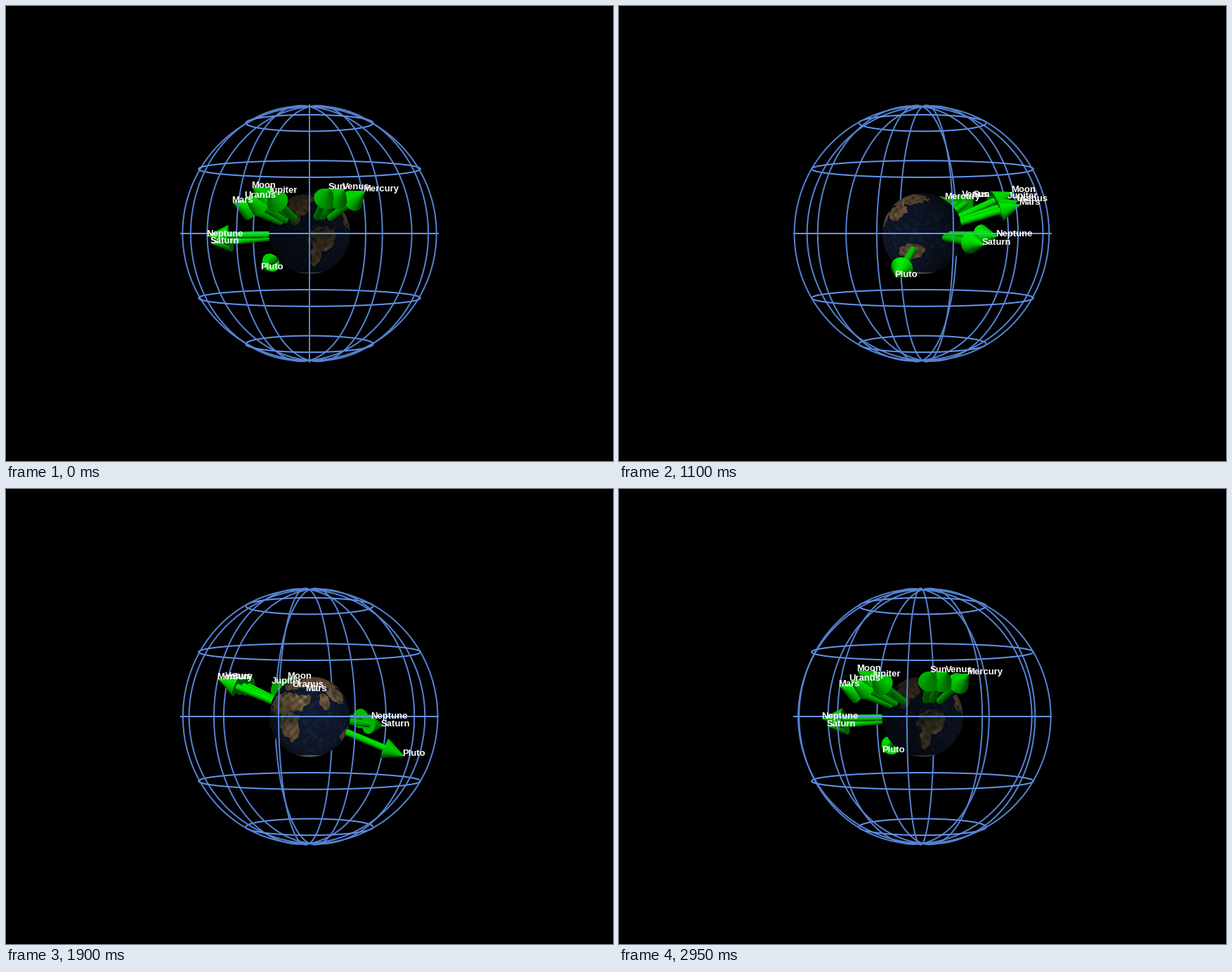
Animation, 864 px wide and 648 px high, one loop 3 s. Source, as a matplotlib script:

```python
import numpy as np
import matplotlib.pyplot as plt
from matplotlib.animation import FuncAnimation
from matplotlib.collections import LineCollection, PolyCollection

W, H, DPI = 864, 648, 100
FRAMES, INTERVAL = 60, 50
CX, CY = W / 2, H / 2
HALF_VIEW = np.radians(15)
FOCAL = CY / np.tan(HALF_VIEW)
DIST = np.sqrt(3) / np.sin(HALF_VIEW)  # fits the unit sphere's bounding box
EARTH_R = 0.319
ARROW = 0.8
LON0 = -77
PX = 72 / DPI

# sky position of each body: right ascension, declination
BODIES = {
    "Sun": (101, 23), "Moon": (56.3, 24.3), "Mercury": (122, 22),
    "Venus": (109.4, 23), "Mars": (44, 16.2), "Jupiter": (67.2, 21),
    "Saturn": (351, -5.8), "Uranus": (52.7, 18.8), "Neptune": (0, -1.4),
    "Pluto": (303.5, -22.6),
}

# land as ragged ovals: longitude, latitude, half width, half height
LAND = [
    (15, 19, 32, 16), (25, -12, 15, 23),                        # Africa
    (20, 51, 28, 11), (95, 58, 70, 16), (105, 33, 20, 14),      # Eurasia
    (46, 23, 11, 9), (78, 21, 8, 12),
    (-105, 57, 45, 14), (-98, 38, 22, 13), (-98, 20, 8, 8),     # Americas
    (-58, -8, 20, 17), (-66, -34, 8, 20),
    (134, -25, 20, 12),                                         # Australia
]
GREENLAND = (-41, 73, 14, 10)


def direction(lon, lat):
    """Unit vector: x right, y up, z towards the camera."""
    lon, lat = np.radians(lon), np.radians(lat)
    return np.stack(np.broadcast_arrays(np.cos(lat) * np.sin(lon), np.sin(lat),
                                        np.cos(lat) * np.cos(lon)), -1)


def spin(p, deg):
    c, s = np.cos(np.radians(deg)), np.sin(np.radians(deg))
    x, y, z = np.moveaxis(p, -1, 0)
    return np.stack([x * c + z * s, y, z * c - x * s], -1)


def project(p):
    k = FOCAL / (DIST - p[..., 2])
    return np.stack([CX + p[..., 0] * k, CY - p[..., 1] * k], -1)


def surface_of_revolution(profile, n=24):
    """Quads and outward normals for (radius, height) pairs along the axis."""
    ang = np.linspace(0, 2 * np.pi, n + 1)
    quads, normals = [], []
    for (r0, h0), (r1, h1) in zip(profile, profile[1:]):
        slope = np.hypot(r1 - r0, h1 - h0)
        nr, nh = (h1 - h0) / slope, (r0 - r1) / slope
        for a, b in zip(ang, ang[1:]):
            ca, sa, cb, sb = np.cos(a), np.sin(a), np.cos(b), np.sin(b)
            quads.append([(r0 * ca, r0 * sa, h0), (r0 * cb, r0 * sb, h0),
                          (r1 * cb, r1 * sb, h1), (r1 * ca, r1 * sa, h1)])
            m = (a + b) / 2
            normals.append((nr * np.cos(m), nr * np.sin(m), nh))
    return np.array(quads), np.array(normals)


def arrow_mesh():
    shaft, head, base = 0.03 * ARROW, 0.1 * ARROW, 0.8 * ARROW
    profile = [(shaft, h) for h in np.linspace(EARTH_R - 0.003, base, 7)]
    profile += [(head * (1 - t), base + (ARROW - base) * t)
                for t in np.linspace(0, 1, 5)]
    return surface_of_revolution(profile)


def wavy(lon, lat, rng, waves=30):
    """Smooth noise of about unit size, seamless in longitude."""
    total = np.zeros_like(lon)
    for _ in range(waves):
        i, j = rng.integers(4, 34, 2)
        p, q = rng.uniform(0, 2 * np.pi, 2)
        bend = 2 * np.sin(np.radians(3 * lat) + q)
        total += np.sin(np.radians(i * lon) + p + bend) * np.cos(np.radians(j * lat) + q)
    return 2 * total / np.sqrt(waves)


def earth_texture():
    lon, lat = np.meshgrid(np.arange(-180, 180, 0.5), np.arange(90, -90, -0.5))
    rng = np.random.default_rng(4)
    coast, grain = wavy(lon, lat, rng), wavy(lon, lat, rng)

    def oval(l, b, w, h):
        dx = (lon - l + 180) % 360 - 180
        return (dx / w) ** 2 + (np.abs(lat - b) / h) ** 2 < 1 + 0.16 * coast

    land = np.any([oval(*o) for o in LAND], axis=0)[..., None]
    ice = (oval(*GREENLAND) | (lat < -69))[..., None]
    tropic = np.exp(-((lat + 2) / 13) ** 2)[..., None]
    ground = (1 - tropic) * np.array([104, 84, 60]) + tropic * np.array([62, 58, 38])
    ground = ground * (1 + 0.13 * grain[..., None])
    sea = np.array([15, 24, 43]) + 5 * np.clip(grain, 0, 2)[..., None]
    tex = np.where(ice, np.array([118, 118, 120]), np.where(land, ground, sea))
    glow = 0.74 + 0.3 * np.cos(np.radians(lon - 70))
    return np.clip(tex * glow[..., None] / 255, 0, 1)


# globe pixels, one ray through each
HALF = 61
gx, gy = np.meshgrid(np.arange(-HALF, HALF) + 0.5, HALF - 0.5 - np.arange(2 * HALF))
rays = np.stack([gx / FOCAL, gy / FOCAL, -np.ones_like(gx)], -1)
qa = (rays ** 2).sum(-1)
disc = np.clip(DIST ** 2 - qa * (DIST ** 2 - EARTH_R ** 2), 0, None)
hit = rays * ((DIST - np.sqrt(disc)) / qa)[..., None] + [0, 0, DIST]
hit /= np.linalg.norm(hit, axis=-1, keepdims=True)
globe_lon = np.degrees(np.arctan2(hit[..., 0], hit[..., 2]))
globe_row = np.clip((90 - np.degrees(np.arcsin(hit[..., 1]))) * 2, 0, 359).astype(int)
globe_shade = (0.6 + 0.42 * np.clip(hit[..., 2], 0, 1))[..., None]
rim = FOCAL * EARTH_R / np.sqrt(DIST ** 2 - EARTH_R ** 2)
globe_alpha = np.clip(rim - np.hypot(gx, gy) + 0.5, 0, 1)[..., None]
TEXTURE = earth_texture()


def globe_image(deg):
    col = (((globe_lon + LON0 - deg + 180) % 360) * 2).astype(int) % 720
    rgb = TEXTURE[globe_row, col] * globe_shade
    return np.concatenate([np.clip(rgb, 0, 1), globe_alpha], -1)


# arrows in world space
mesh, mesh_n = arrow_mesh()
axes3 = np.array([direction(ra - 90, dec) for ra, dec in BODIES.values()])
faces, normals = [], []
for w in axes3:
    u = np.cross([0, 1, 0], w)
    u /= np.linalg.norm(u)
    basis = np.array([u, np.cross(w, u), w])
    faces.append(mesh @ basis)
    normals.append(mesh_n @ basis)
faces, normals = np.concatenate(faces), np.concatenate(normals)
owner = np.repeat(np.arange(len(axes3)), len(mesh))
LIGHT = np.array([-0.1, 0.5, 0.86])


def arrow_polys(deg):
    """Visible faces, far to near, split into behind and before the globe."""
    p, n = spin(faces, deg), spin(normals, deg)
    to_cam = np.array([0, 0, DIST]) - p.mean(1)
    seen = (n * to_cam).sum(-1) > 0
    order = np.argsort(-np.linalg.norm(to_cam, axis=-1))
    order = order[seen[order]]
    rgb = np.zeros((len(p), 3))
    rgb[:, 1] = 0.3 + 0.64 * np.clip(n @ LIGHT, 0, 1)
    front = (spin(axes3, deg)[:, 2] > 0.04)[owner]
    flat = project(p)
    return [(flat[i], rgb[i]) for i in (order[~front[order]], order[front[order]])]


def meridians(deg):
    lat = np.linspace(-90, 90, 91)
    back, front = [], []
    for lon in np.arange(0, 360, 30) + deg:
        near = np.cos(np.radians(lon)) > 0
        (front if near else back).append(project(direction(lon, lat)))
    return back, front


fig = plt.figure(figsize=(W / DPI, H / DPI), dpi=DPI, facecolor="black")
ax = fig.add_axes([0, 0, 1, 1])
ax.axis("off")

BLUE, DIM_BLUE = "#6495ed", "#5683d2"


def grid_lines(color, z, segs=()):
    lines = LineCollection(list(segs), colors=color, linewidths=2 * PX, zorder=z)
    return ax.add_collection(lines)


half_turn = np.linspace(-90, 90, 121)
parallels = range(-60, 90, 30)
grid_lines(BLUE, 1, [project(direction(half_turn + 180, t)) for t in parallels])
grid_lines(BLUE, 6, [project(direction(half_turn, t)) for t in parallels])
far_grid, near_grid = grid_lines(DIM_BLUE, 1), grid_lines(DIM_BLUE, 6)
arrow_sets = [ax.add_collection(PolyCollection([], linewidths=0.4, zorder=z))
              for z in (2, 4)]
globe = ax.imshow(globe_image(0), extent=(CX - HALF, CX + HALF, CY + HALF, CY - HALF),
                  interpolation="nearest", aspect="auto", zorder=3)
ax.set_xlim(0, W)
ax.set_ylim(H, 0)
labels = [ax.text(0, 0, name, color="white", family="Liberation Sans", weight="bold",
                  size=13.1 * PX, ha="left", va="baseline", zorder=8)
          for name in BODIES]


def update(i):
    deg = i * 360 / FRAMES
    for lines, segs in zip((far_grid, near_grid), meridians(deg)):
        lines.set_segments(segs)
    for polys, (verts, rgb) in zip(arrow_sets, arrow_polys(deg)):
        polys.set_verts(list(verts))
        polys.set_facecolor(rgb)
        polys.set_edgecolor(rgb)
    globe.set_data(globe_image(deg))
    for label, tip in zip(labels, project(spin(axes3 * ARROW, deg))):
        label.set_position(tip - [2, 0])
    return [far_grid, near_grid, globe, *arrow_sets, *labels]


anim = FuncAnimation(fig, update, frames=FRAMES, interval=INTERVAL,
                     init_func=lambda: update(0), repeat=True, repeat_delay=0)
plt.show()
```
